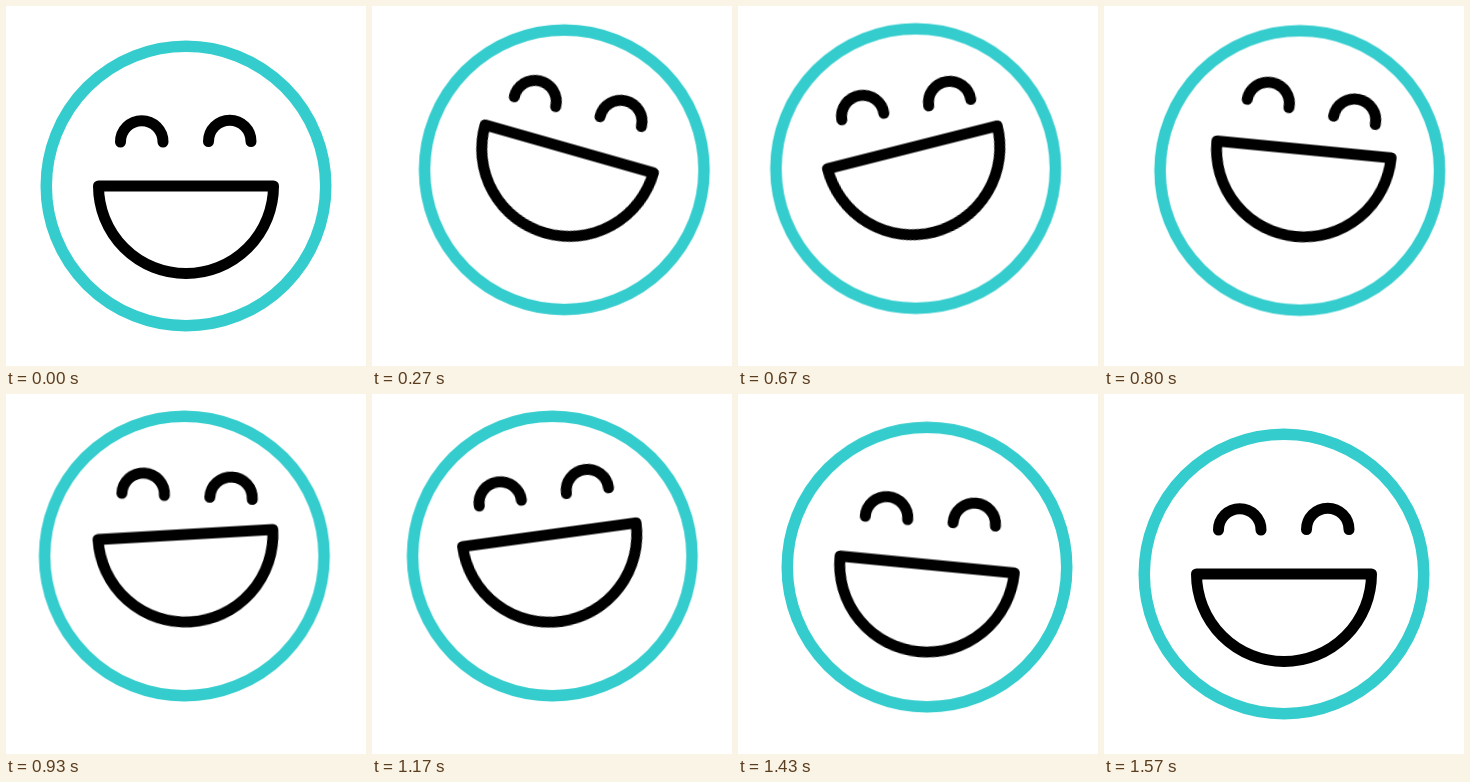
Animation, 360 px wide and 360 px high, one loop 2 s. Source, as an HTML page:

```html
<!DOCTYPE html>
<html lang="en">
<head>
<meta charset="utf-8">
<title>Laughing face</title>
<style>
  html, body { margin: 0; width: 100%; height: 100%; overflow: hidden; background: #fff; }
  svg { display: block; width: 100vw; height: 100vh; }
  g {
    transform-origin: 180px 180px;
    animation: 2s cubic-bezier(.37, 0, .63, 1) infinite;
  }
  circle, path { fill: none; stroke: #000; stroke-width: 11; stroke-linecap: round; stroke-linejoin: round; }
  circle { stroke: #34cccd; stroke-width: 11.5; }

  .sway { animation-name: sway; }
  .bounce { animation-name: bounce; }
  .face { animation-name: rock; }
  .eyes { --rise: -15.5px; animation-name: rise; }
  .mouth { --rise: -21.5px; animation-name: rise; }
  .grin { animation-name: grin; }

  @keyframes sway {
    0% { transform: translateX(0); }
    13.33% { transform: translateX(12.3px); }
    27.67% { transform: translateX(-18px); }
    40% { transform: translateX(15.8px); }
    52.33% { transform: translateX(-16px); }
    65% { transform: translateX(17.5px); }
    78.33%, 100% { transform: translateX(0); }
  }
  @keyframes bounce {
    0% { transform: translateY(0); }
    13.33% { transform: translateY(-16.2px); }
    20% { transform: translateY(-17.8px); }
    27.67% { transform: translateY(-15px); }
    34.17% { transform: translateY(-17.5px); }
    40% { transform: translateY(-15.5px); }
    46.67% { transform: translateY(-18px); }
    52.33% { transform: translateY(-15.5px); }
    58.33% { transform: translateY(-18px); }
    65% { transform: translateY(-15px); }
    77.5%, 100% { transform: translateY(0); }
  }
  @keyframes rock {
    0% { transform: rotate(0); }
    13.33% { transform: rotate(13.4deg); }
    30.33% { transform: rotate(-14deg); }
    41.17% { transform: rotate(12deg); }
    54.5% { transform: rotate(-14deg); }
    65.83% { transform: rotate(8deg); }
    78.33%, 100% { transform: rotate(0); }
  }
  @keyframes rise {
    0% { transform: translateY(0); }
    11.67%, 62.5% { transform: translateY(var(--rise)); }
    74.17%, 100% { transform: translateY(0); }
  }
  @keyframes grin {
    0% { transform: rotate(0); }
    13.33% { transform: rotate(2.5deg); }
    33.33% { transform: rotate(-5.4deg); }
    46.67% { transform: rotate(-6.2deg); }
    58.33% { transform: rotate(0); }
    71.67% { transform: rotate(1deg); }
    78.33%, 100% { transform: rotate(0); }
  }
</style>
</head>
<body>
<svg viewBox="0 0 360 360">
  <g class="sway">
    <g class="bounce">
      <circle cx="180" cy="180" r="139.75"/>
      <g class="face">
        <g class="eyes">
          <path d="M114.5 136a21.25 21.25 0 0 1 42.5 0"/>
          <path d="M202.5 135.5a21.25 21.25 0 0 1 42.5 0"/>
        </g>
        <g class="mouth">
          <g class="grin">
            <path d="M92.5 180h175a87.5 87.5 0 0 1-175 0z"/>
          </g>
        </g>
      </g>
    </g>
  </g>
</svg>
</body>
</html>
```
